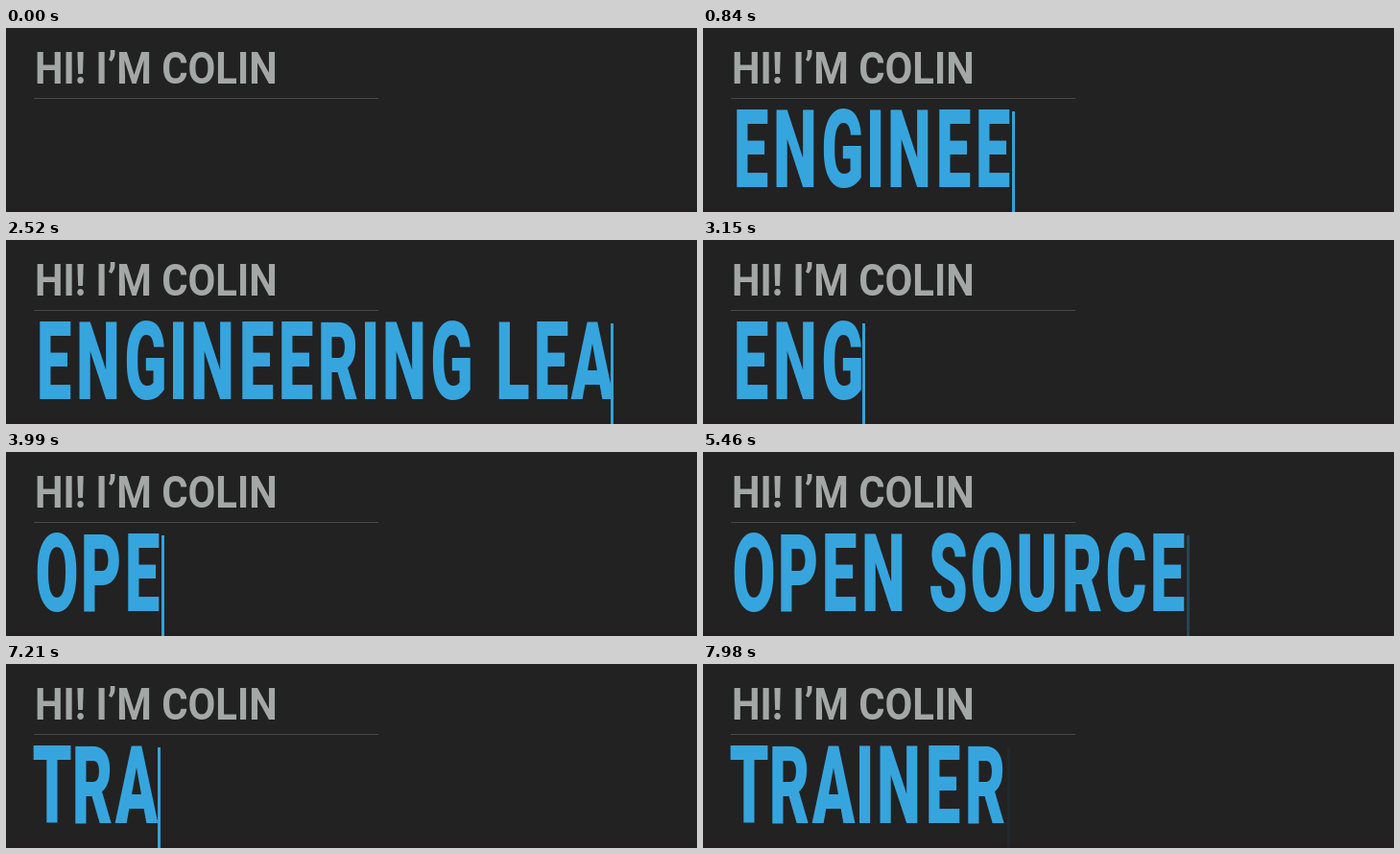
These frames come from a looping animation (720 px wide and 192 px high, 8 s). An HTML page:

```html
<!DOCTYPE html>
<html lang="en">
<head>
<meta charset="utf-8">
<title>Typed introduction</title>
<style>
  html, body { margin: 0; width: 100%; height: 100%; overflow: hidden; background: #222; }
  svg { display: block; width: 720px; height: 192px; }
  text { font-family: Roboto, "Open Sans", sans-serif; white-space: pre; }
  .greeting { font-size: 46.4px; font-weight: 700; fill: #a3a7a6; }
  .role { font-size: 112.5px; font-weight: 900; fill: #36a5de; text-anchor: middle; }
</style>
</head>
<body>
<svg viewBox="0 0 720 192">
  <rect width="720" height="192" fill="#222"/>
  <rect y="187" width="720" height="5" fill="#221f20"/>
  <text class="greeting" transform="translate(30 57.8) scale(.9 1)">HI! I’M COLIN</text>
  <rect x="29" y="73" width="359" height="1" fill="#484848"/>
  <text class="role" id="role" transform="translate(0 166) scale(.58 1)"></text>
  <rect id="caret" y="87" width="3" height="105" fill="#35a2da"/>
</svg>
<script>
const LOOP = 8000;
const LEFT = 29;
const CONDENSE = 0.58;
const ERASE_STEP = 54;

// Letter spacing of the condensed face, in pixels.
const ADVANCE = {
  A: 45, C: 45, D: 47, E: 41, G: 48, I: 20, L: 39, N: 51,
  O: 47, P: 45, R: 47, S: 44, T: 37, U: 47, ' ': 20
};

const every = (start, step, count) => Array.from({ length: count }, (_, i) => start + i * step);

// typed: when each letter appears; erase: when deleting starts;
// idle: start of blinking once the line is complete or empty again.
const ROLES = [
  { text: 'ENGINEERING LEAD', typed: every(410, 70, 16), erase: 2470, idle: [1460, 3360] },
  { text: 'OPEN SOURCE', erase: 5610, idle: [4610, 6230],
    typed: [3840, 3910, 3980, 4050, 4105, 4120, 4260, 4330, 4400, 4540, 4610] },
  { text: 'TRAINER', erase: Infinity, idle: [7730, Infinity],
    typed: [6990, 7130, 7200, 7340, 7410, 7620, 7760] }
];

const role = document.getElementById('role');
const caret = document.getElementById('caret');
const blink = caret.animate(
  [{ opacity: 1, easing: 'ease' }, { opacity: 0, easing: 'ease' }, { opacity: 1 }],
  { duration: 700, iterations: Infinity }
);
blink.pause();

function stateAt(t) {
  const current = ROLES.filter(r => t >= r.typed[0]).pop();
  if (!current) return { text: '', erasing: true, phase: t + 350 };

  const { text, typed, erase, idle } = current;
  const erasing = t >= erase;
  const count = erasing
    ? Math.max(0, text.length - 1 - Math.floor((t - erase) / ERASE_STEP))
    : typed.filter(time => t >= time).length;
  const rest = idle[erasing ? 1 : 0];
  return { text: text.slice(0, count), erasing, phase: Math.max(0, t - rest) };
}

function draw(t) {
  const { text, erasing, phase } = stateAt(t);
  let end = LEFT;
  const centres = [...text].map(letter => {
    const centre = end + ADVANCE[letter] / 2 + 0.5;
    end += ADVANCE[letter];
    return (centre / CONDENSE).toFixed(2);
  });
  role.setAttribute('x', centres.join(' '));
  if (role.textContent !== text) role.textContent = text;
  caret.setAttribute('x', erasing ? end - 3 : end);
  blink.currentTime = phase % 700;
}

function tick() {
  draw(performance.now() % LOOP);
  requestAnimationFrame(tick);
}
tick();
</script>
</body>
</html>
```
